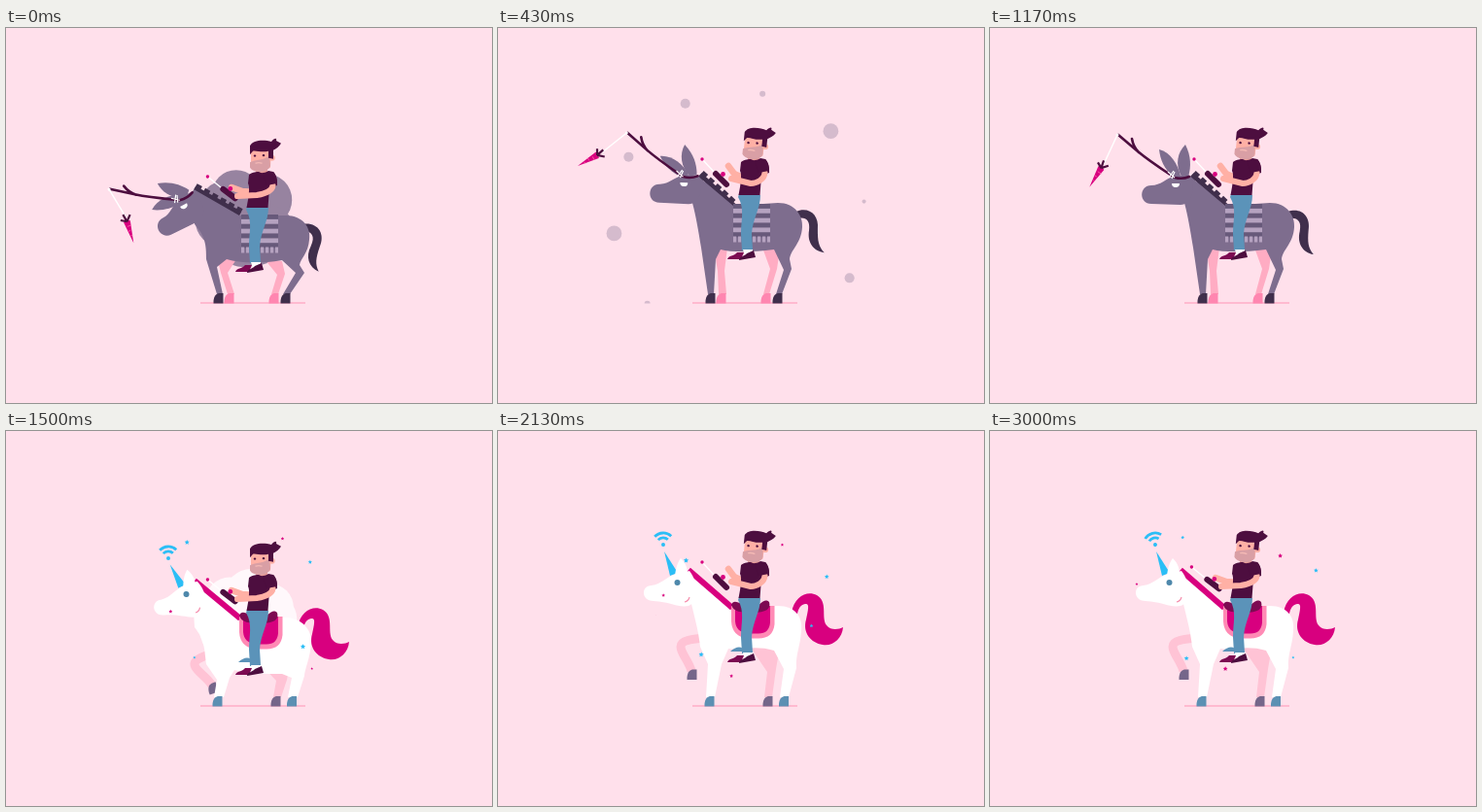
An HTML page that plays this animation: 500x386 px, repeating every 3.03 s.

```html
<!DOCTYPE html>
<html>
<head>
<meta charset="utf-8">
<style>
html, body { margin: 0; width: 100%; height: 100%; overflow: hidden; background: #ffe0eb; }
svg { display: block; width: 500px; height: 386px; }
</style>
</head>
<body>
<svg id="stage" viewBox="0 0 500 386"></svg>
<script>
const LOOP = 3030, SWAP = 1496, BURST = 540;
const GREY = '#7e6d8e', DARK = '#402f4c', PLUM = '#4d0e3f', SKIN = '#ffb0a5', ROSE = '#ffacc3', HOOF = '#ff86b0',
  PALE = '#ffc3d5', MAGENTA = '#d8007f', BLUE = '#2bbef6', JEANS = '#5b93b9', STEEL = '#5c90b3';

// Value at time t from [time, value] pairs, eased between them.
function key(t, ...ks) {
  if (t <= ks[0][0]) return ks[0][1];
  for (let i = 1; i < ks.length; i++) {
    const [t0, a] = ks[i - 1], [t1, b] = ks[i];
    if (t < t1) {
      const p = (t - t0) / (t1 - t0);
      return a + (b - a) * p * p * (3 - 2 * p);
    }
  }
  return ks[ks.length - 1][1];
}

// Blends two paths of the same structure.
function mix(a, b, k) {
  const to = b.match(/-?[\d.]+/g);
  let i = 0;
  return a.replace(/-?[\d.]+/g, n => (+n + (to[i++] - n) * k).toFixed(2));
}

const seeded = n => {
  const x = Math.sin(n * 12.9898) * 43758.5453;
  return x - Math.floor(x);
};
const polar = (angle, d) => [Math.cos(angle) * d, Math.sin(angle) * d];
const range = n => [...Array(n).keys()];

const fill = (d, color) => `<path d="${d}" fill="${color}"/>`;
const line = (d, color, w, extra = '') =>
  `<path d="${d}" fill="none" stroke="${color}" stroke-width="${w}" ${extra}/>`;
const round = 'stroke-linecap="round" stroke-linejoin="round"';
const dot = (x, y, r, color) => `<circle cx="${x}" cy="${y}" r="${r}" fill="${color}"/>`;
const group = (transform, ...parts) => `<g transform="${transform}">${parts.join('')}</g>`;
const hoof = (x, y, color, turn = 0) =>
  group(`translate(${x} ${y}) rotate(${turn})`, fill('M-5.5 5.5V3C-5 -3 -2 -5 1 -5H4.5V5.5Z', color));

// A ring of dots that flies out, slows down and shrinks.
const SIZES = [25, 25, 15, 39, 10, 25];
function burst(u, color, count, turn) {
  if (u >= BURST) return '';
  const left = 1 - u / BURST, reach = 26 + 108 * (1 - left ** 2);
  const dots = range(count).map(i => {
    const [x, y] = polar(turn + i / count * 2 * Math.PI, reach);
    return dot(248 + x, 195 + y, Math.min(27, SIZES[i % SIZES.length] * left), color);
  });
  return `<g opacity="${0.2 + 0.6 * left}" clip-path="url(#sky)">${dots.join('')}</g>`;
}

const STAR = 'M' + range(10).map(i => polar((i / 5 - .5) * Math.PI, i % 2 ? .5 : 1)).join('L') + 'Z';

// Small stars that pop up around the rider, a new set every 300 ms.
function twinkle(u) {
  return range(6).map(set => {
    const age = u - set * 300, s = Math.min(1, 1.15 - Math.abs(age) / 245);
    if (s <= 0) return '';
    return range(7).map(i => {
      const n = set * 7 + i + 1;
      const [x, y] = polar((i + seeded(n)) / 7 * 2 * Math.PI, 70 + 40 * seeded(n + 50));
      const r = s * (1.2 + 1.6 * seeded(n + 100));
      return group(`translate(${255 + x} ${178 + y * .8}) rotate(${age / 8}) scale(${r})`, fill(STAR, i % 2 ? MAGENTA : BLUE));
    }).join('');
  }).join('');
}

function donkey(u, c) {
  const nod = key(u, [0, 1], [40, 1], [220, -.2], [430, -.04], [830, 0]);
  const tail = key(u, [0, 9], [40, 9], [430, -9], [830, 0], [1150, -5], [1500, 0]);
  const swing = key(u, [0, -31], [140, -38], [470, 55], [850, -15], [1180, 25], [1500, -15]);
  const dangle = key(u, [0, 15], [430, 11], [830, -18], [1180, 8], [1500, -8]);
  const flop = key(u, [0, 1], [60, 1], [250, -.2], [430, .4], [640, -.06], [830, 0]);

  const carrot = group(`rotate(${swing + 28 * nod} 131 110)`,
    line('M131 110V143', '#fff', 1.4),
    group(`rotate(${dangle} 131 143)`,
      fill('M127.5 148Q131 146 134.5 148L131.5 171Z', MAGENTA),
      line('M130 153H134M129 158H132M131 163H133', '#ff6fae', .7),
      line('M131 148L125 145M131 148L129 140M131 148L136 142', PLUM, 2.2)));

  const head = group(`translate(${-8 * nod} ${22 * nod}) rotate(${-28 * nod} 191 161)`,
    group(`rotate(${-45 * flop} 199 152)`, fill('M197 153C190 140 193 128 201 120C207 132 207 143 204 153Z', GREY)),
    group(`rotate(${-50 * flop} 193 152)`, fill('M189 154C179 145 175 135 174 125C186 128 193 140 196 152Z', GREY)),
    fill('M166 181C153 181 153 162 166 162C176 162 180 155 191 152L206 152C212 165 208 182 196 182Z', GREY),
    fill('M187 160H195A4 4 0 0 1 187 160Z', '#fff'),
    line('M205 153C198 156 194 155 190 154C178 146 164 137 152 127L132 110M153 128C149 124 147 120 146 114', PLUM, 2.6, round),
    line('M183 148L190 154M184 154L189 147M187 155L190 148', '#fff', 1.2),
    carrot,
    dot(131, 110, 1.5, '#fff'));

  const stripes = range(7).map(i =>
    `<rect x="242" y="${181 + i * 4.9}" width="38" height="4.9" fill="${i % 2 ? '#b5a2c0' : '#67597a'}"/>`);
  const mane = mix('M208 151L243 183', 'M194 165L241 191', c);

  return group(`translate(0 ${13 * c}) rotate(${tail} 308 190)`,
      fill('M306 189C320 185 330 195 326 210C324 222 324 228 329 235C318 232 313 222 317 210C320 200 316 195 306 196Z', DARK)) +
    fill(mix('M222 226L236 226L233 250L235 274L227 274L226 250Z', 'M217 236L237 238L228 252L235 274L228 274L221 252Z', c), ROSE) +
    fill(mix('M272 226L290 228L287 248L279 274L273 274L280 248Z', 'M266 238L284 240L287 253L280 274L273 274L279 254Z', c), ROSE) +
    hoof(230, 278, HOOF) + hoof(276, 278, HOOF) +
    line(mane, DARK, 5) + line(mane, DARK, 11, 'stroke-dasharray="6 3.6"') +
    fill(mix(
      'M204 151L242 183L288 180C306 180 314 194 313 205C312 222 301 228 300 238L302 248L292 274L286 274L294 249L284 228C260 231 240 231 229 228L224 238L222 274L216 274L209 226C206 208 204 195 200 180Z',
      'M193 166L240 193L288 193C306 193 314 206 312 218C311 232 303 237 302 244L307 252L292 274L285 274L298 252L284 239C260 243 240 242 227 238L217 246L223 274L217 274L206 238C206 222 205 215 194 202Z', c), GREY) +
    hoof(219, 278, DARK) + hoof(288, 278, DARK) + head +
    group(`translate(0 ${11 * c})`, ...stripes, line('M242 217.5H280', '#b5a2c0', 6, 'stroke-dasharray="3.2 1.8"'));
}

function unicorn(u, c) {
  const tilt = -9 + 7 * Math.cos(u / 100);
  const lift = key(u, [0, 0], [300, 18], [560, 0]);
  const wifi = group(`translate(${170 - 3 * c} ${117 + 14 * c}) rotate(${tilt})`,
    dot(0, 0, 2, BLUE),
    line('M-5 -5A7 7 0 0 1 5 -5M-8.5 -8.5A12 12 0 0 1 8.5 -8.5', BLUE, 2.8));
  const head = group(`translate(${c} ${12 * c}) rotate(${-6 * c} 184 156)`,
    fill('M171 124L185 146L177 149Z', BLUE),
    fill('M182 149C183 140 185 135 188 131C194 137 195 142 195 149Z', '#fff'),
    fill('M160 175C147 175 147 159 158 159C168 158 174 149 184 147L197 144C206 155 207 176 196 180C185 182 178 176 160 175Z', '#fff'),
    dot(184.5, 156, 3, '#4e88ab'),
    line('M192 176Q196 175 197 171', '#f58fae', 1.2));
  const saddle = group(`translate(0 ${11 * c})`,
    fill('M240 180H284.5V199Q283 213.5 268 213.5H257Q241 212 240 196Z', '#ff8ab5'),
    fill('M244 180H280V197Q279 208.5 268 208.5H257Q245 207 244 196Z', MAGENTA),
    fill('M240 179C243 171 250 180 262 181C270 181 273 171 279 176C281 183 276 187 262 187C250 187 242 186 240 179Z', '#7d0a52'),
    fill('M239 227C245 221 252 221 254 227Z', JEANS));

  return wifi + group(`translate(${-2 * c} ${15 * c})`,
      fill('M302 187C305 170 318 164 328 169C340 176 332 192 338 200C343 206 351 204 355 202C354 214 344 222 334 220C322 218 313 208 317 194C319 184 321 177 316 178C311 179 309 183 308 188Z', MAGENTA)) +
    line(mix('M216 213C200 214 188 215 188 222C188 229 196 236 199 247', 'M214 228C203 232 193 235 194 241C196 248 207 253 212 262', c), PALE, 9) +
    hoof(200 + 13 * c - lift / 4, 250.5 + 14 * c, '#75668a', lift - 20 * c) +
    fill(mix('M258 220L290 222L286 245L282 274L274 274L277 248Z', 'M260 238L292 240L289 256L283 274L275 274L278 257Z', c), PALE) +
    hoof(278, 278, '#75668a') +
    fill(mix(
      'M195 144L240 181L288 180C306 180 314 192 312 206C311 222 306 230 307 244L299 274L290 274L294 245L284 226C265 220 250 226 237 224L230 240L223 274L214 274L216 240L208 222C206 205 203 195 199 178Z',
      'M191 156L240 192L288 192C306 193 315 206 314 218C313 234 307 246 307 252L300 274L290 274L294 254L284 250C265 250 250 250 235 246L230 254L224 274L214 274L217 256L206 240C204 222 204 215 194 202Z', c), '#fff') +
    hoof(218, 278, STEEL) + hoof(294.5, 278, STEEL) +
    line(mix('M196 143L241 182', 'M194 154L241 193', c), MAGENTA, 6) + head + saddle;
}

function rider(u, c) {
  const press = key(u, [0, 1], [60, 1], [240, 0], [1340, 0], [1450, 1]);
  const lean = key(u, [0, 0], [60, 0], [260, 6]);
  const remote = group(`translate(0 ${2 * press}) rotate(${-8 * press} 230 155)`,
    line('M223 149L210 135', '#fff', 1.3),
    dot(210, 135, 1.7, MAGENTA),
    line('M224 150L235 161', PLUM, 6, round),
    dot(231.5, 150.5, 2.4, MAGENTA));
  const head = group(`rotate(${lean} 262 134) translate(0 14) scale(1 .89)`,
    fill('M252 107L273 108L272 131Q262 138 252 131Z', SKIN),
    dot(273.5, 120, 3.3, SKIN),
    fill('M251 125C257 121 266 123 271 117L272 129C270 138 254 138 251 131Z', '#d99fa5'),
    line('M257 126Q260 125 263 126', '#f4b9b5', 1.5, round),
    dot(256, 117.5, 1.3, PLUM), dot(265, 117, 1.3, PLUM),
    fill('M251 116V106C254 98 267 99 273 101C276 97 279 96 278 100L283 103C281 107 278 109 275 111L275 121L270 120V112C263 114 257 111 254 112Z', PLUM));

  return group(`translate(0 ${13 * c})`,
    fill('M236 238C237 234 243 235 246 231L253 231L250 238Z', '#7d0a52'),
    fill('M248 171L270 172C270 186 262 196 261 212L262 228L251 229L250 212C250 198 254 186 247 174Z', JEANS),
    fill('M252 228L262 228L262 231L254 234Z', '#fff'),
    fill('M248 239C248 235 254 235 256 232L263 229L265 236Z', PLUM),
    line(mix('M256 156L243 150L237 142', 'M256 156L243 155L232 151', press), SKIN, 6.5, round),
    fill('M257 128H269V140H257Z', '#e89c98'),
    fill('M250 138C254 135 258 135 260 135Q265 138 270 134L275 135C279 139 279 144 279 149L271 152L269.5 172H247.5C250 160 251 150 249 147Z', PLUM),
    remote,
    line(mix('M274.5 149C274 156 266 160 260 160L240 155', 'M274.5 149C274 156 264 158 258 159L238 160', press), SKIN, 6, round),
    fill('M264 136L275 135Q279 140 279 147L268 149Z', PLUM),
    head);
}

const stage = document.getElementById('stage');
function draw(now) {
  const t = now % LOOP, horned = t >= SWAP;
  const u = horned ? Math.max(0, t - 1500) : t;
  const crouch = key(u, [0, 1], [40, 1], [190, -.12], [300, 0]);
  stage.innerHTML = '<clipPath id="sky"><path d="M0 0H500V283.5H0Z"/></clipPath>' +
    line('M200 283H308', '#ffbad0', 1.9) +
    (horned
      ? burst(u, '#fff', 14, -2.76) + unicorn(u, crouch) + rider(u, crouch) + twinkle(u)
      : burst(u, GREY, 10, -2.64) + donkey(u, crouch) + rider(u, crouch));
}

const start = performance.now();
function tick() {
  draw(performance.now() - start);
  requestAnimationFrame(tick);
}
tick();
</script>
</body>
</html>
```
